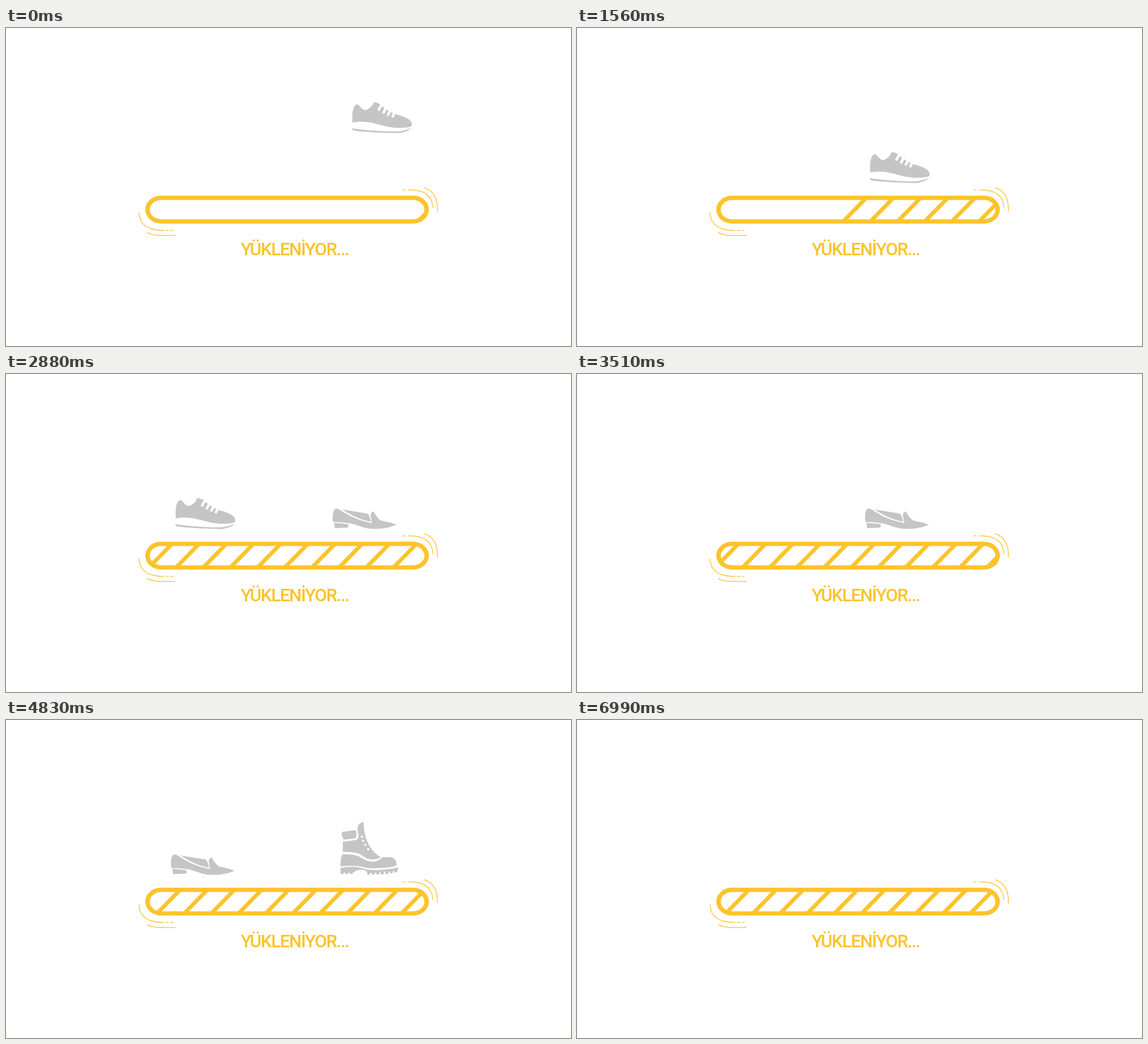
An HTML page that plays this animation: 998x561 px, repeating every 7320 ms.

```html
<!DOCTYPE html>
<html lang="tr">
<head>
<meta charset="utf-8">
<title>Yükleniyor</title>
<style>
  html, body { margin: 0; width: 100%; height: 100%; overflow: hidden; background: #fff; }
  svg { display: block; width: 998px; height: 561px; }
  .shoe { fill: #c5c5c5; }
  .gap { fill: #fff; }
  .thin { fill: none; stroke: #fdc63c; stroke-width: 1.5; stroke-linecap: round; }
  .label { font: 500 31.5px Roboto, "Open Sans", sans-serif; font-stretch: 82%; fill: #fcc32c; }
</style>
</head>
<body>
<svg viewBox="0 0 998 561">
  <defs>
    <clipPath id="inside"><rect x="251" y="300" width="492" height="41" rx="24" ry="20.5"/></clipPath>
  </defs>

  <g clip-path="url(#inside)">
    <g id="stripes" stroke="#fcc32c" stroke-width="7"></g>
  </g>
  <path fill="#fcc32c" fill-rule="evenodd" d="
    M274 295.7H719A28 24.6 0 0 1 719 344.9H274A28 24.6 0 0 1 274 295.7Z
    M274 303.4H719A20 17 0 0 1 719 337.4H274A20 17 0 0 1 274 303.4Z"/>

  <g class="thin">
    <path d="M739 282C754 286 763 300 762 323"/>
    <path d="M701 285.5H705M711 285.5C738 285 753 295 754 317"/>
    <path d="M235 326C236 348 251 357 279 357M283 357H287M291 357H295"/>
    <path d="M250 361Q259 366 273 366H299"/>
  </g>
  <text class="label" id="label" x="414.5" y="401">YÜKLENİYOR...</text>

  <g class="shoe" id="sneaker">
    <path d="M1 37C0 22 1 12 6 6Q10 3 13 7Q18 14 24 15Q33 12 37 5Q39 0 42 1L49 4Q60 15 77 22C90 26 106 30 106 40C106 44 103 44 100 45Q88 47 76 46C55 44 45 38 28 36Q12 34 1 37Z"/>
    <path d="M0 47Q0 50 4 51C25 54 60 55 82 55.5Q98 54 105 46Q95 51 82 52.5C55 53 20 50 0 47Z"/>
    <path d="M52 6L47.500 14M60 11L56 19M67.500 15.500L64 23M75 19.500L72 26" fill="none" stroke="#fff" stroke-width="4.500" stroke-linecap="round"/>
  </g>

  <g class="shoe" id="flat">
    <path d="M1 24Q-1 8 4 1Q8 -1 14 3C26 11 40 20 70 26Q68 17 67 11Q70 5 73 6C79 16 81 21 92 23Q104 25 113 29C100 34 88 37 72 36C52 36 45 28 28 26Q14 24 1 24Z"/>
    <path d="M17 2L61 9Q65 10 68 23.500Q45 20 17 2Z"/>
    <path d="M3 25.500Q15 26 28 28V33Q28 34 26 34L4 35Z"/>
  </g>

  <g class="shoe" id="boot">
    <path d="M4 18Q4 17 7 17L28 14Q30 20 29 26Q28 29 25 29L7 31Q2 26 4 18Z"/>
    <path d="M42 0C36 1 31 4 31 13L33 24Q33 31 27 32L5 35Q6 44 5 53Q25 52 36 57Q48 66 57 66Q66 66 72 62Q58 54 50 38Q42 22 42 0Z"/>
    <path d="M4 57Q22 56 34 61C42 66 50 70 58 70Q68 69 76 62L90 62Q100 64 100 74V77Q88 81 70 81Q50 83 40 79Q25 76 1 78Q1 65 4 57Z"/>
    <path d="M1 81Q22 77 38 81Q52 86 70 84.500Q90 83 103 80L102 86L50 90L46 86Q44 84 36 84.500Q28 84 25 89L2 89Z"/>
    <path d="M4 89H24M51 90L80 89.500L101 85.500" fill="none" stroke="#c5c5c5" stroke-width="6" stroke-linecap="round" stroke-dasharray="0 8"/>
    <g class="gap">
      <circle cx="39" cy="26" r="2"/><circle cx="41" cy="33" r="2"/>
      <circle cx="45" cy="40" r="2"/><circle cx="50" cy="48" r="2"/>
    </g>
  </g>
</svg>
<script>
  const LOOP = 7320, LAST = 6990, STEP = 30;
  const PITCH = 48, FIRST = 731, BELT_SPEED = 0.165, BELT_END = 6890;
  const EVERY = 1980, DROP = 88, FALL = 240;
  const SPEED = 0.166, ROLL = 300, RAMP = 1400;
  const LEAVE = 2880, FADE = 150;
  const TEXT_WIDTH = 191;
  const $ = id => document.getElementById(id);

  // resting place of each shoe, in order of arrival
  const shoes = [
    { el: $('sneaker'), x: 611, y: 218 },
    { el: $('flat'), x: 598, y: 237 },
    { el: $('boot'), x: 609, y: 180 }
  ];

  const clamp = v => Math.min(1, Math.max(0, v));
  const smooth = u => u * u * (3 - 2 * u);

  // constant acceleration over RAMP, then constant speed
  function travel(t) {
    if (t <= 0) return 0;
    return SPEED * (t < RAMP ? t * t / (2 * RAMP) : t - RAMP / 2);
  }

  let lines = '';
  for (let i = 0; i < 36; i++) {
    const x = FIRST + i * PITCH;
    lines += `<path d="M${x - 4} 342L${x + 37} 300"/>`;
  }
  $('stripes').innerHTML = lines;

  // tracking that gives the label its overall length
  const label = $('label');
  const tracking = (TEXT_WIDTH - label.getComputedTextLength()) / label.textContent.length;
  label.style.letterSpacing = tracking + 'px';

  function draw(t) {
    const shift = BELT_SPEED * Math.min(t, BELT_END);
    $('stripes').setAttribute('transform', `translate(${-shift} 0)`);
    shoes.forEach((s, i) => {
      const age = t - i * EVERY;
      const x = s.x - travel(age - ROLL);
      const y = s.y - DROP * (1 - smooth(clamp(age / FALL)));
      s.el.setAttribute('transform', `translate(${x} ${y})`);
      s.el.setAttribute('opacity', age < 0 ? 0 : 1 - clamp((age - LEAVE) / FADE));
    });
  }

  const begin = performance.now();
  function tick() {
    const t = (performance.now() - begin) % LOOP;
    draw(Math.min(LAST, Math.floor(t / STEP) * STEP));
    requestAnimationFrame(tick);
  }
  draw(0);
  requestAnimationFrame(tick);
</script>
</body>
</html>
```
